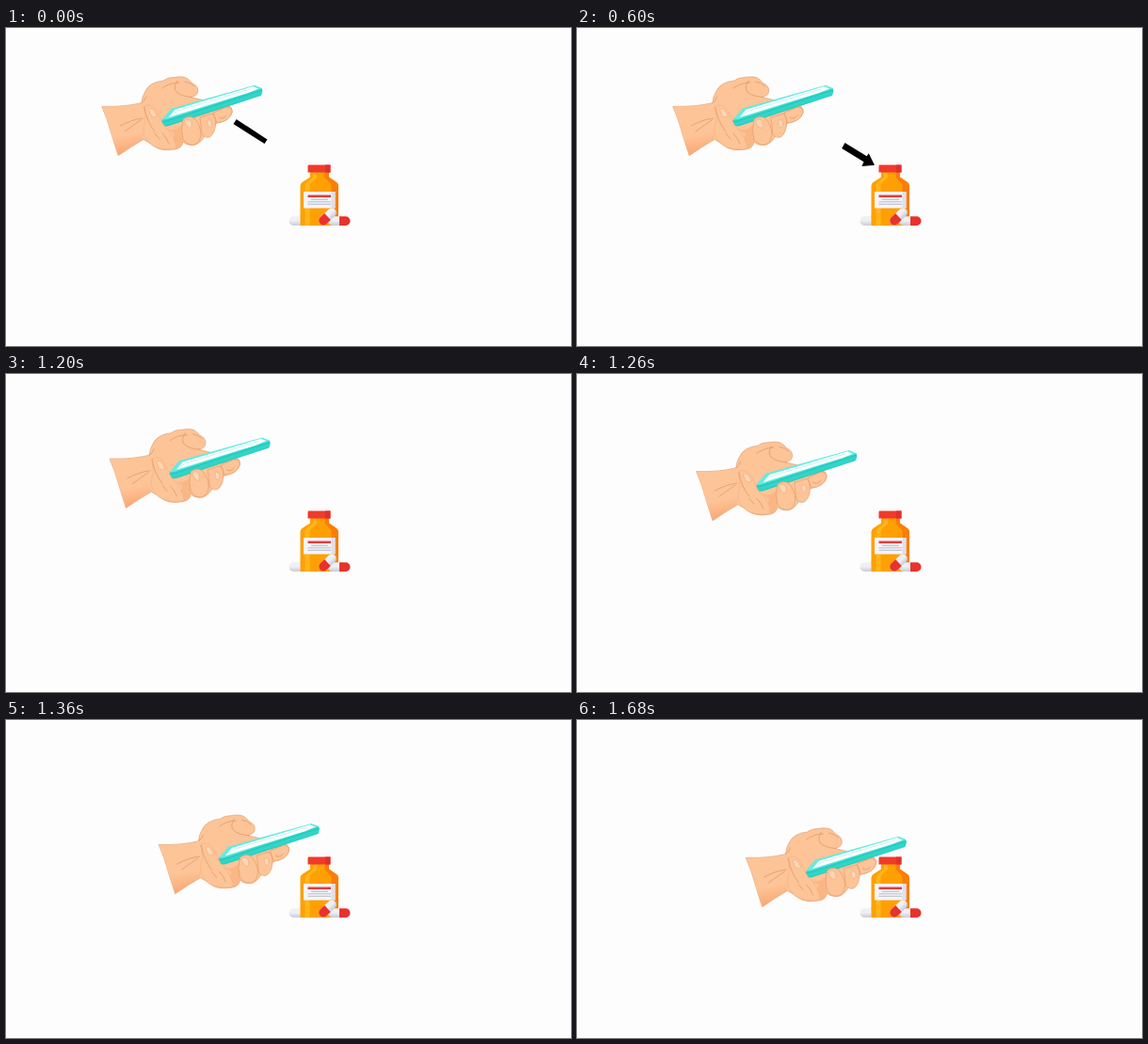
Recreate the animation shown at these times as an HTML page. Size 600 by 338 pixels, loop 1700 ms.

```html
<!DOCTYPE html>
<html lang="en">
<head>
<meta charset="utf-8">
<title>Phone to medicine</title>
<style>
  html, body { margin: 0; width: 100%; height: 100%; overflow: hidden; background: #fefdfe; }
  svg { display: block; width: 100%; height: 100%; }
  .skin { fill: #fdc497; stroke: #dd9766; stroke-width: .6; stroke-linejoin: round; }
  .shade { fill: #f8ad7a; opacity: .6; }
  .crease { fill: none; stroke: #d08a5b; stroke-width: .55; stroke-linecap: round; }
  .nail { fill: #fdd6b4; stroke: #dc9a6c; stroke-width: .4; }
</style>
</head>
<body>
<svg viewBox="0 0 600 338">
  <defs>
    <linearGradient id="wrist" x1=".42" y1="0" x2=".58" y2="1">
      <stop offset=".62" stop-color="#fdc497"/>
      <stop offset="1" stop-color="#f9a570"/>
    </linearGradient>
    <linearGradient id="white" x2="0" y2="1">
      <stop offset=".45" stop-color="#eff0f5"/>
      <stop offset=".9" stop-color="#ced1dc"/>
    </linearGradient>
  </defs>

  <g id="bottle">
    <path fill="#fea004" d="M323 153H343V158.500L351 164Q353 165.500 353 168V210H312.500V168Q312.500 165.500 314.500 164L323 158.500Z"/>
    <path fill="#ffb51c" d="M326 154H330V159L323.500 165Q322.500 166 322.500 168V210H317.500V168Q317.500 166 319 164.500L326 158.500Z"/>
    <path fill="#fb7d08" d="M338.500 153H343V158.500L351 164Q353 165.500 353 168V210H345.500V168Q345.500 166 344 164.500L338.500 159Z"/>
    <path fill="#f03a2c" d="M321 145.500H344.500V153.500H320.500V147Z"/>
    <path fill="#e0312b" d="M339 145.500H344.500V153.500H339Z"/>
    <path fill="#f4f4fa" d="M316 174H349.500V191.500H316Z"/>
    <path fill="#dfe0ea" d="M345.500 174H349.500V191.500H345.500Z"/>
    <path fill="#e83c38" d="M320.500 177.500H345V180H320.500Z"/>
    <path fill="none" stroke="#a9adc0" stroke-width=".8" d="M324 182.300H342M320.500 184.800H345M320.500 187.300H345"/>
    <rect x="300.500" y="200.200" width="15" height="9.800" rx="4.800" fill="url(#white)"/>
    <path fill="#fea004" d="M312.500 199H317V210H312.500Z"/>
    <rect x="342" y="200.200" width="23.500" height="9.800" rx="4.800" fill="url(#white)"/>
    <path fill="#e9322d" d="M354 200.200H360.700A4.800 4.900 0 0 1 360.700 210H354Z"/>
    <g transform="translate(341.500 200.500) rotate(-43)">
      <rect x="-11" y="-4.800" width="22" height="9.600" rx="4.800" fill="url(#white)"/>
      <path fill="#e9322d" d="M0-4.800H-6.200A4.800 4.800 0 0 0-6.200 4.800H0Z"/>
    </g>
  </g>

  <path id="dash" d="M244.700 97L277.500 118.500L274.500 123L241.500 102Z"/>
  <path id="arrow" d="M284.500 122L307.700 136.200L309.800 133.300L316 145.800L302.500 147L304.500 142.200L281.200 128Z"/>

  <g id="hand">
    <path class="skin" d="M101.800 83.300Q126 84 144 79.500Q144.500 73 147 69Q150 62 155 59.500Q160 56.500 167 56Q171 52.500 178 52.500Q187 51 191.500 53Q195 55 197.500 58.500Q203.500 61 203.800 66Q204 72.500 196 73.500Q215 78 234 82Q241 83 240 90Q237 99 224 101L212 113Q206 124 199 124.500Q192 125 188 121Q187 128 179 129Q164 131.500 156 125Q151 121 146 118.500Q133 126 119.200 135.700Q112.500 115 107.500 98Z"/>
    <path fill="url(#wrist)" d="M102.200 83.600Q126 84.400 144 80Q147 99 145.500 118.300Q133 126 119.400 135.200Q112.500 115 107.700 98Z"/>
    <path class="shade" d="M165 104Q179 113 187 103L188 120Q187 128 179 128.500Q164 130 158 126Q178 124 179 112Z" opacity=".4"/>
    <path class="crease" d="M144 79.500Q147 78 149 73M121 104Q134 97 145 96M126 110Q137 102 143 98M166 64Q174 58 184 58M182 56Q177 63 181 68Q187 73 197 73.500M190 57Q196 58 200 62"/>

    <path fill="#2fd6c9" d="M165 99L176 87L263.500 61.500L271.500 64Q273.500 67 271 71.500L172 104Q167 105 165 99Z"/>
    <path fill="#67eae0" d="M165.500 97.500L175.500 85.500L264 60.800L272 64.200L171 97Z"/>
    <path fill="#fff" d="M172.500 95L179.500 86.800L262.500 62L268 64.400L257 69Z"/>
    <path fill="none" stroke="#9eeee7" stroke-width=".6" d="M176.500 92L181.500 88.300L260 64.700"/>
    <path fill="none" stroke="#22b9af" stroke-width=".6" d="M165 99Q168 100.500 172 98.500L272 66M166 102Q168 105 173 103.500L271 71.500"/>

    <path class="skin" d="M146 84Q151 80 157 84Q162 90 165 98Q168 106 173 109Q180 118 181 128Q166 131 155 124.500Q145 117 146 106Q150 97 146 84Z" stroke-opacity=".4"/>
    <path class="nail" d="M151.500 86.500Q155 84 158 89L160.500 94Q157 96 154 93Z"/>
    <path class="crease" d="M147 84Q149 99 158 110M166 112Q171 117 173 123M158 112L163 118"/>

    <path class="skin" d="M220 90L234 84Q241 84 240 90Q238 99 224 101Z"/>
    <path class="skin" d="M206 95L219 91Q223 95 222.500 103Q222 111 217 115.500Q212 118 208 113Z"/>
    <path class="skin" d="M188 97Q194 92 200 96Q206.500 103 207 113Q206 122 200 124Q192 125 188 118Q185 108 188 97Z"/>
    <path class="nail" d="M189.500 98.500Q193 95.500 196.500 99Q198.500 104 196 106.500Q191.500 106 189.500 98.500Z"/>
    <path class="nail" d="M213.500 99Q217 96 218.500 100Q219.500 104 216.500 106Q213.500 104 213.500 99Z"/>
    <path class="crease" d="M226 95Q230 98 234 93"/>
  </g>
</svg>
<script>
  const LOOP = 1700;
  // Each key: time, progress, slope per ms
  const keys = [
    [1100, 0, 0], [1200, .104, .0026], [1300, .49, .0043],
    [1420, .968, .0012], [1500, 1, 0]
  ];
  const [hand, dash, arrow] = ["hand", "dash", "arrow"].map(id => document.getElementById(id));

  function progress(t) {
    if (t <= keys[0][0]) return 0;
    const i = keys.findIndex(k => t < k[0]);
    if (i < 0) return 1;
    const [t0, a, m] = keys[i - 1], [t1, b, n] = keys[i];
    const d = t1 - t0, u = (t - t0) / d, v = 1 - u;
    return v * v * ((1 + 2 * u) * a + u * d * m) + u * u * ((3 - 2 * u) * b - v * d * n);
  }

  const show = (el, on) => { el.style.display = on ? "" : "none"; };

  function draw(now) {
    const t = now % LOOP, p = progress(t);
    hand.setAttribute("transform", `translate(${77.5 * p} ${63 * p})`);
    show(dash, t < 80 || t >= 480 && t < 580);
    show(arrow, t >= 100 && t < 300 || t >= 600 && t < 900);
    requestAnimationFrame(draw);
  }
  draw(0);
</script>
</body>
</html>
```
